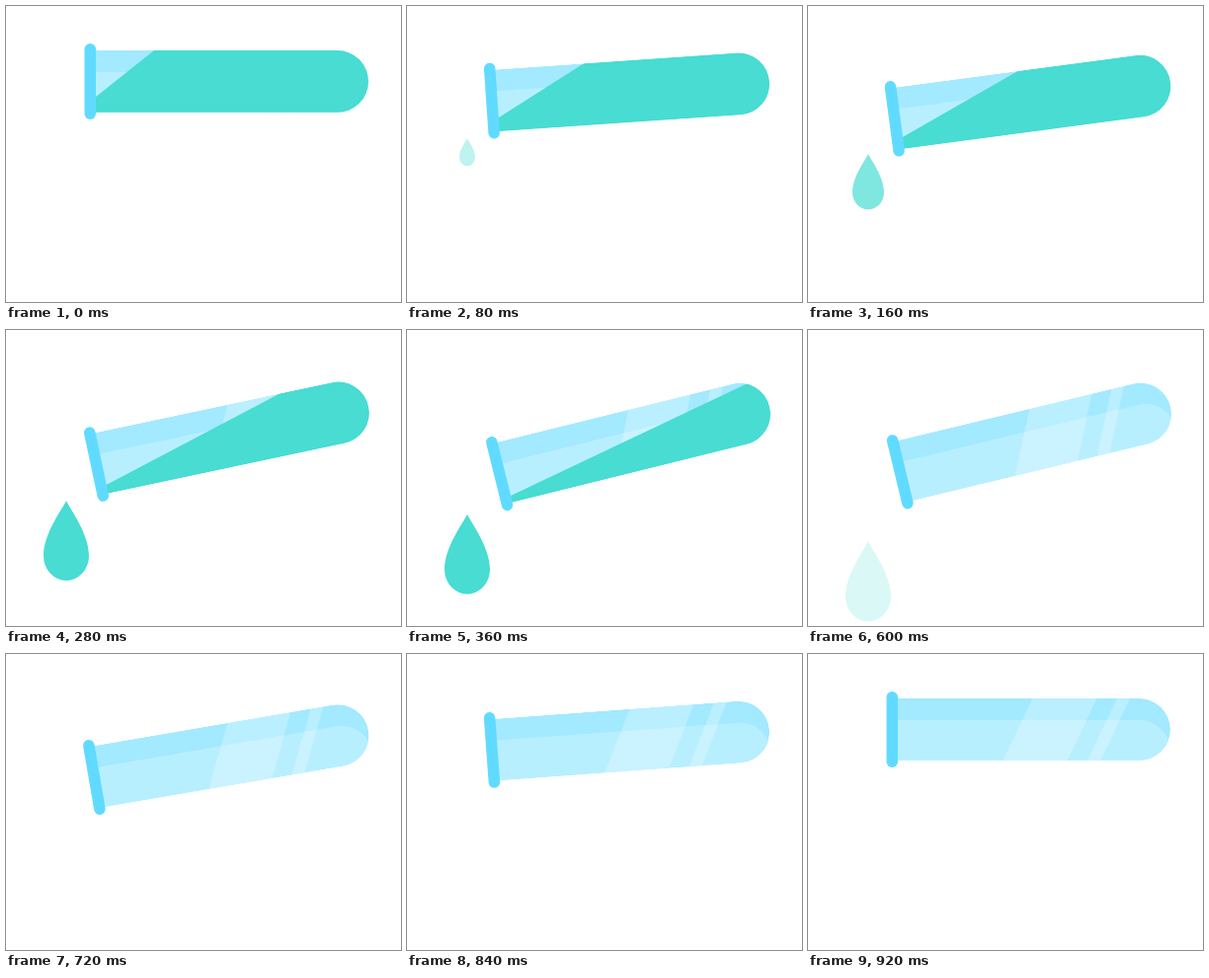
Write an HTML page that moves like this. It is 400 px wide and 300 px high and loops after 1000 ms.

```html
<!DOCTYPE html>
<html lang="en">
<head>
<meta charset="utf-8">
<title>Pouring test tube</title>
<style>
html, body { margin: 0; width: 100%; height: 100%; overflow: hidden; background: #fff; }
svg { display: block; width: 100%; height: 100%; }
</style>
</head>
<body>
<svg viewBox="0 0 400 300">
  <defs>
    <path id="glass" d="M86 45H335.6a31.4 31.4 0 0 1 0 62.8H86z"/>
    <clipPath id="inside"><use href="#glass"/></clipPath>
  </defs>
  <g id="tube">
    <g clip-path="url(#inside)">
      <use href="#glass" fill="#a3e9ff"/>
      <use href="#glass" y="22" fill="#b8efff"/>
      <path d="M227.5 45h65l-30 63h-65zM313 45h13l-30 63h-13z" fill="#fff" opacity=".25"/>
      <path id="liquid" fill="#48dcd2"/>
    </g>
    <rect x="79.5" y="38" width="11.5" height="77" rx="5.75" fill="#60dbff"/>
  </g>
  <path id="drop" fill="#48dcd2" d="M0 0C4 9 23 33 23 56A23 25 0 0 1-23 56C-23 33-4 9 0 0z"/>
</svg>
<script>
const LOOP = 1000, STEP = 40, LAST = 920, PEAK = 475;
const [tube, liquid, drop] = ['tube', 'liquid', 'drop'].map(id => document.getElementById(id));

// Liquid surface in tube space: [time, height at the mouth, slope]
const surface = [
  [0, 92, .797], [80, 94, .545], [160, 96, .41], [280, 99, .283],
  [360, 101, .203], [440, 105, .135], [520, 111.5, .066], [600, 116, 0], [LOOP, 116, 0]
];

const clamp = v => Math.max(0, Math.min(1, v));
const sinDeg = a => Math.sin(a * Math.PI / 180);

function surfaceAt(t) {
  const i = surface.findIndex(k => k[0] > t);
  const a = surface[i - 1], b = surface[i];
  const p = (t - a[0]) / (b[0] - a[0]);
  return [1, 2].map(j => a[j] + (b[j] - a[j]) * p);
}

function draw(t) {
  const swing = t < PEAK ? t / PEAK : (LAST - t) / (LAST - PEAK);
  tube.setAttribute('transform', `rotate(${-15 * sinDeg(90 * swing)} 372 76.5)`);

  const [mouth, slope] = surfaceAt(t);
  const y = x => mouth - slope * (x - 91);
  liquid.setAttribute('d', `M85 ${y(85)}L370 ${y(370)}V120H85z`);

  const grow = clamp(t / 230);
  const top = 142 + 76 * sinDeg(.15 * (t - 120));
  drop.setAttribute('transform', `translate(61 ${top}) scale(${grow})`);
  drop.setAttribute('opacity', Math.min(grow, clamp((640 - t) / 200)));
}

function tick(now) {
  const t = now % LOOP;
  draw(Math.min(LAST, Math.floor(t / STEP) * STEP));
  requestAnimationFrame(tick);
}
draw(0);
requestAnimationFrame(tick);
</script>
</body>
</html>
```
